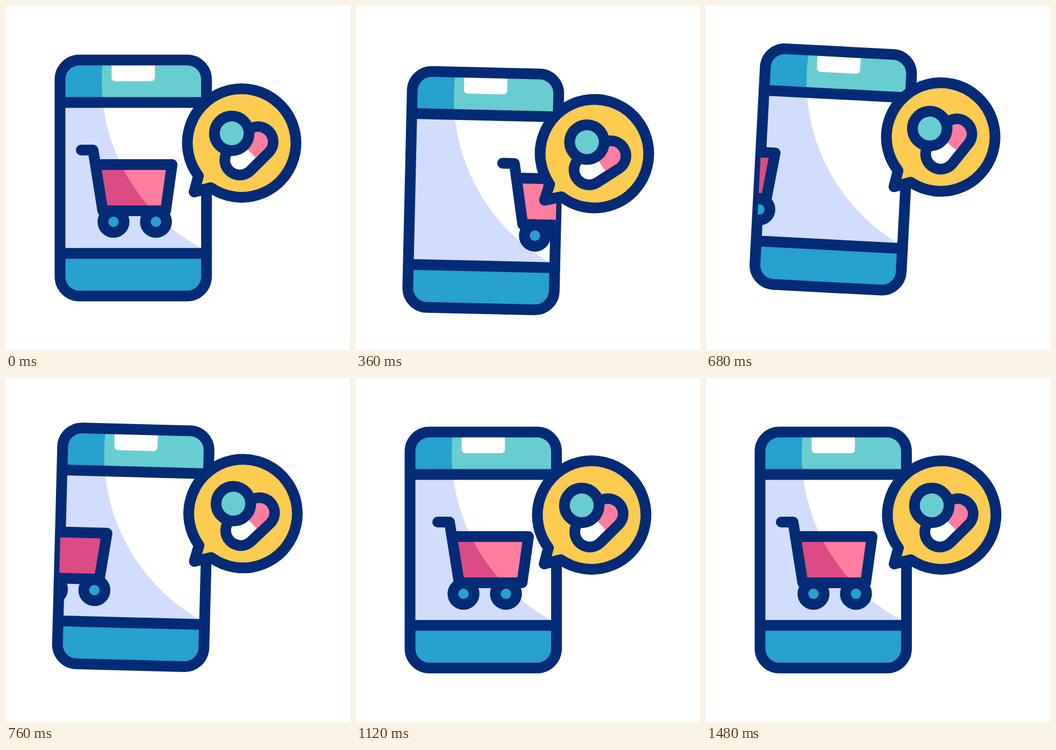
Recreate the animation shown at these times as an HTML page. Size 640 by 640 pixels, loop 1680 ms.

```html
<!DOCTYPE html>
<html lang="en">
<head>
<meta charset="utf-8">
<title>Pharmacy cart on a phone</title>
<style>
  html, body { margin: 0; height: 100%; overflow: hidden; background: #fff; }
  svg { display: block; width: 100%; height: 100%; }
  .line { stroke: #042b76; stroke-width: 20; stroke-linecap: round; stroke-linejoin: round; }
  .blue { fill: #27a1ce; }
  .teal { fill: #68cdd1; }
  .pink { fill: #ff7d9e; }
</style>
</head>
<body>
<svg viewBox="0 0 640 640">
  <defs>
    <clipPath id="case"><rect x="100.5" y="100.5" width="272.5" height="439" rx="36"/></clipPath>
    <clipPath id="light"><circle cx="531" cy="140" r="353"/></clipPath>
    <path id="basket" d="M163 295H309L297 381H180L167 295Z"/>
  </defs>

  <g id="phone">
    <g clip-path="url(#case)">
      <path class="blue" d="M100 100H374V540H100Z"/>
      <path fill="#d2dcfd" d="M100 180H374V460H100Z"/>
      <g clip-path="url(#light)">
        <path class="teal" d="M100 100H374V180H100Z"/>
        <path fill="#fff" d="M100 180H374V460H100Z"/>
      </g>
      <path fill="#fff" d="M196.5 105H277V133a7 7 0 0 1-7 7H203.5a7 7 0 0 1-7-7Z"/>
    </g>
    <rect class="line" fill="none" x="100.5" y="100.5" width="272.5" height="439" rx="36"/>
    <path class="line" d="M101 179.5H373M101 460.3H373"/>

    <g clip-path="url(#case)">
      <g class="body"><use href="#basket" fill="#db4b85"/></g>
      <g clip-path="url(#light)"><g class="body"><use href="#basket" class="pink"/></g></g>
      <g class="body line" fill="none">
        <path d="M140 268H162L180 381H297L309 295H167"/>
      </g>
      <g id="wheels" class="blue line">
        <circle cx="200" cy="401.5" r="19.7"/>
        <circle cx="279" cy="401.5" r="19.7"/>
      </g>
    </g>
  </g>

  <g id="bubble">
    <path class="line" fill="#fdcb50" d="M358 316A101 101 0 1 1 381 338L350 346Z"/>
    <g id="pills">
      <g transform="translate(452 269.5) rotate(-45)">
        <rect x="-62" y="-38" width="124" height="76" rx="38" fill="#042b76"/>
        <rect x="-42" y="-18" width="84" height="36" rx="18" fill="#fff"/>
        <path class="pink" d="M0-18H24a18 18 0 0 1 0 36H0Z"/>
      </g>
      <circle class="teal line" cx="420" cy="237" r="32.2"/>
    </g>
  </g>
</svg>
<script>
const LOOP = 1680, STEP = 40;
const $ = id => document.getElementById(id);
const bodies = document.querySelectorAll('.body');

// Keys are [time, value]; values ease in and out between neighbours.
function track(t, ...keys) {
  if (t <= keys[0][0]) return keys[0][1];
  for (let i = 1; i < keys.length; i++) {
    const [t0, a] = keys[i - 1], [t1, b] = keys[i];
    if (t < t1) return a + (b - a) * (1 - Math.cos(Math.PI * (t - t0) / (t1 - t0))) / 2;
  }
  return keys[keys.length - 1][1];
}

const progress = (t, from, to) => Math.min(1, Math.max(0, (t - from) / (to - from)));

// Speeds off to the right, then rolls in from the left and slows down.
function drive(t, exit, stopTime, stopX) {
  if (t < 600) return exit * progress(t, 80, 480) ** 1.8;
  return stopX - (253 + stopX) * (1 - progress(t, 600, stopTime)) ** 2;
}

const move = (el, x, y, angle = 0, cx = 0, cy = 0) =>
  el.setAttribute('transform', `translate(${x} ${y}) rotate(${angle} ${cx} ${cy})`);

function draw(t) {
  const phoneY = track(t, [80, 0], [330, 25], [600, -21.5], [835, 0]);
  const tilt = track(t, [80, 0], [270, 3], [520, -2.9], [680, 3], [840, 0]);
  move($('phone'), 0, phoneY, tilt, 236.8, 320);

  const bodyX = t < 1160 ? drive(t, 250, 1155, 13) : track(t, [1160, 13], [1480, 0]);
  bodies.forEach(el => move(el, bodyX, 0));
  move($('wheels'), drive(t, 256, 1080, 0), 0);

  const bubbleY = track(t, [80, 0], [320, 16.8], [670, -10], [840, 0]);
  const swing = track(t, [80, 0], [295, 6.8], [520, -14], [735, 1.4], [1000, 0]);
  move($('bubble'), 0, bubbleY, swing, 362, 362);

  const spin = track(t, [80, 0], [335, 10], [590, -8.5], [860, 4], [1080, 0]);
  move($('pills'), 0, 0, spin, 439, 256);
}

function frame() {
  const t = performance.now() % LOOP;
  draw(Math.floor(t / STEP) * STEP);
  requestAnimationFrame(frame);
}
frame();
</script>
</body>
</html>
```
